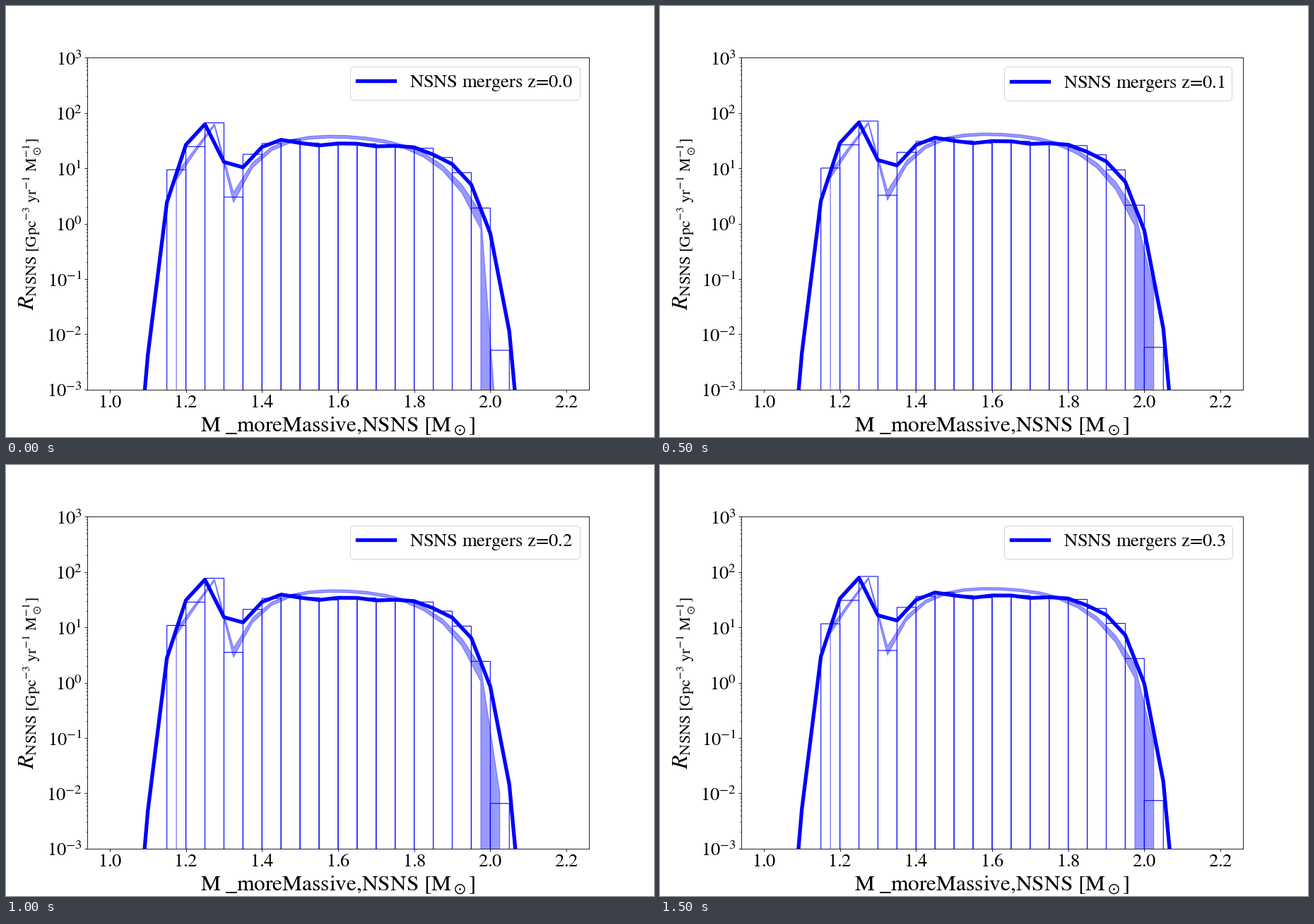
These frames come from a looping animation (917x611 px, 2000 ms). A matplotlib script:

```python
import matplotlib.pyplot as plt
import numpy as np
from matplotlib.animation import FuncAnimation
from matplotlib.ticker import FuncFormatter, LogLocator, MultipleLocator, NullFormatter

W, H = 917, 611
DPI = W / 12
FRAMES = 4
STEP = 0.05                 # bin width in solar masses
LOWEST = -6.3               # decades, well below the visible range
SPACE = r"\hspace{0.346}"   # width of a plain text space
TIGHT = r"\hspace{-0.2}"    # cancels the automatic math spacing

EDGES = 1.05 + STEP * np.arange(22)
BINS = EDGES[2:20]
CENTRES = BINS[:-1] + STEP / 2
BAND_TAIL = [-4.4, -1.2, -2.0, -1.1]    # noisy last band point, in decades

plt.rcParams.update({"font.family": "Liberation Serif", "mathtext.fontset": "stix"})


# All shapes are log10 of the rate as a function of the mass m.
def bump(m, height, centre, width, power=2):
    return height * np.exp(-np.abs((m - centre) / width) ** power)


def onset(m, depth, start, width):
    return -depth * np.exp((start - m) / width)


def cutoff(m, depth, end, width):
    return -depth * np.exp((m - end) / width)


def plateau(m):
    ripple = 0.025 * np.cos(2 * np.pi * (m - 1.625) / 0.16)
    return 1.44 + ripple + bump(m, 0.06, 1.44, 0.05)


def growth(m, k):
    return k / (FRAMES - 1) * (0.09 + 0.08 * (m - 1.15))


def curve_rate(k):
    m = EDGES
    shape = (plateau(m) + onset(m, 1.09, 1.15, 0.04) + cutoff(m, 1.6, 2.0, 0.067)
             + bump(m, 0.6, 1.233, 0.041) + bump(m, -0.5, 1.328, 0.05))
    return 10 ** np.maximum(shape + growth(m, k), LOWEST)


def bar_rate(k):
    m = BINS
    shape = (plateau(m) + onset(m, 0.49, 1.15, 0.022) + cutoff(m, 1.18, 1.95, 0.06)
             + bump(m, 0.45, 1.25, 0.028) + bump(m, -1.05, 1.307, 0.0325)
             + bump(m, -1, 2.0, 0.02))
    return 10 ** (shape + growth(m, k))


def band_outline(k):
    m = CENTRES
    mid = (1.65 + onset(m, 0.66, 1.175, 0.03) + cutoff(m, 1.6, 1.975, 0.11)
           + bump(m, 0.77, 1.27, 0.031) + bump(m, -1.2, 1.325, 0.07, power=1)
           + growth(m, k))
    spread = 0.16 * 10 ** (-mid / 2)    # counting error
    up, low = mid + spread, mid - spread
    x = np.r_[m[0], m, m[-1], m[-1] + STEP]
    top = np.r_[LOWEST, up, up[-1], BAND_TAIL[k]]
    bottom = np.r_[LOWEST, low, LOWEST, LOWEST]
    return np.column_stack([np.r_[x, x[::-1]], 10 ** np.r_[top, bottom[::-1]]])


def legend_text(k):
    return rf"$\mathrm{{NSNS{SPACE}mergers{SPACE}z{TIGHT}={TIGHT}0.{k}}}$"


fig = plt.figure(figsize=(12 + 1e-6, H / DPI + 1e-6), dpi=DPI, facecolor="white")
ax = fig.add_subplot()
ax.set_yscale("log")

bars = ax.bar(BINS, bar_rate(0), width=STEP, bottom=10 ** LOWEST, align="edge",
              fill=False, edgecolor="blue", linewidth=1, snap=False)
band, = ax.fill(*band_outline(0).T, color="blue", alpha=0.4, linewidth=1)
curve, = ax.plot(EDGES, curve_rate(0), color="blue", linewidth=5, label=legend_text(0))
legend = ax.legend(loc="upper left", fontsize=25, borderpad=0.37, borderaxespad=0,
                   bbox_to_anchor=(487 / W, 1 - 86 / H), bbox_transform=fig.transFigure)

ax.set_xlim(0.94, 2.26)
ax.set_ylim(1e-3, 1e3)
ax.xaxis.set_major_locator(MultipleLocator(0.2))
ax.xaxis.set_major_formatter(FuncFormatter(lambda v, _: f"${v:.1f}$"))
ax.yaxis.set_major_locator(LogLocator(numticks=12))
ax.yaxis.set_major_formatter(FuncFormatter(lambda v, _: f"$10^{{{round(np.log10(v))}}}$"))
ax.yaxis.set_minor_locator(LogLocator(subs=range(2, 10), numticks=12))
ax.yaxis.set_minor_formatter(NullFormatter())
ax.tick_params(axis="x", labelsize=25, pad=4.5)
ax.tick_params(axis="y", labelsize=25, pad=3)

fig.text(470 / W, 1 - 603 / H,
         rf"$\mathrm{{M{SPACE}\_moreMassive,{TIGHT}NSNS{SPACE}[M_\odot]}}$",
         fontsize=29.6, ha="center", va="baseline")
fig.text(39 / W, 1 - 309 / H,
         rf"$R_{{\mathrm{{NSNS{SPACE}[Gpc^{{-3}}{SPACE}yr^{{-1}}{SPACE}M_\odot^{{-1}}]}}}}$",
         fontsize=30, ha="center", va="baseline", rotation=90, rotation_mode="anchor")


def update(k):
    curve.set_ydata(curve_rate(k))
    for bar, top in zip(bars, bar_rate(k)):
        bar.set_height(top - 10 ** LOWEST)
    band.set_xy(band_outline(k))
    legend.get_texts()[0].set_text(legend_text(k))
    return [curve, band, legend, *bars]


anim = FuncAnimation(fig, update, frames=FRAMES, interval=500, repeat=True,
                     repeat_delay=0, init_func=lambda: update(0))
plt.show()
```
